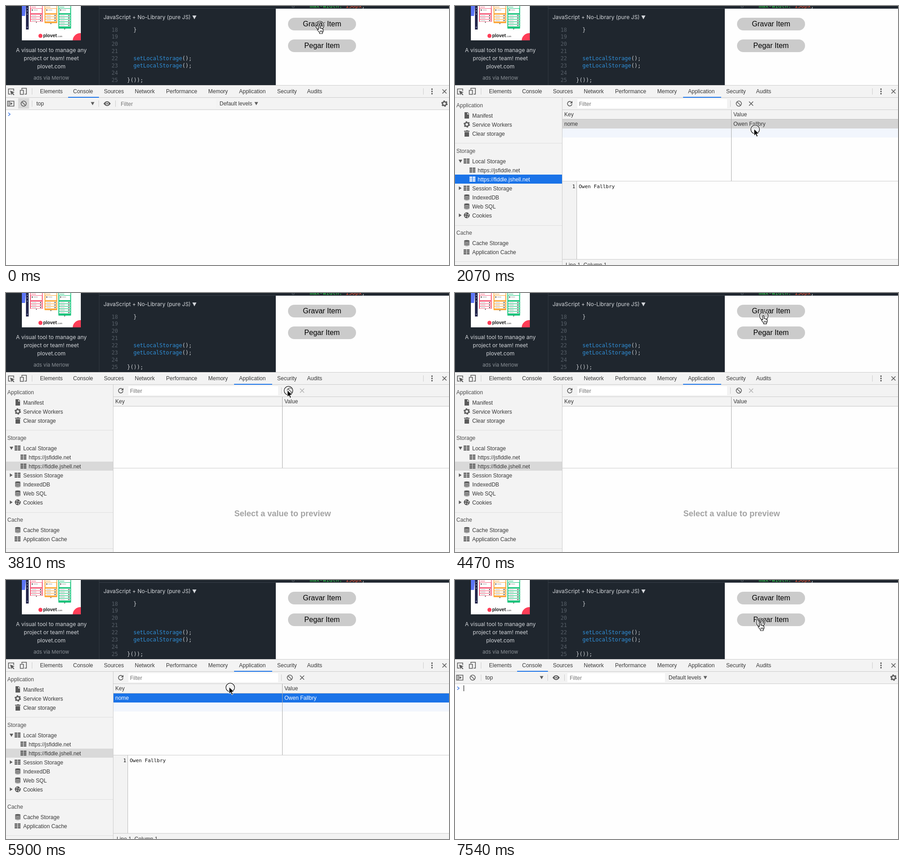
These frames come from a looping animation (977 px wide and 573 px high, 8000 ms). An HTML page:

```html
<!DOCTYPE html>
<html lang="pt">
<head>
<meta charset="utf-8">
<title>Local storage demo</title>
<style>
html, body { margin: 0; width: 100%; height: 100%; overflow: hidden; background: #fefefe; }
svg { display: block; width: 977px; height: 573px; }
text { font: 12px "Liberation Sans", Arial, sans-serif; fill: #383838; white-space: pre; }
.code { font: 11.9px "DejaVu Sans Mono", monospace; fill: #c9ccd0; }
.call { fill: #2f90da; }
.num { fill: #565e67; text-anchor: end; }
.ui { font: 12px Inter, sans-serif; fill: #d3d6da; }
.mid { text-anchor: middle; }
.small { font-size: 11px; fill: #8b9197; }
.btn { font-size: 16px; fill: #000; }
.soft { fill: #757575; }
.head { fill: #4c4c4c; }
.mono { font: 11px "DejaVu Sans Mono", monospace; fill: #111; }
.empty { font-size: 18px; font-weight: bold; fill: #a3a3a3; }
.icon { color: #5c5c5c; fill: currentColor; stroke: none; }
.line { fill: none; stroke: #5c5c5c; stroke-width: 1.6; }
.bar { fill: #f3f3f3; }
.focus rect.sel { fill: #1a73e8; }
.focus text { fill: #fff; }
.focus .icon { color: #fff; }
</style>
</head>
<body>
<svg id="stage" viewBox="0 0 977 573">
<defs>
  <path id="table" d="M-7-5.500h6v3h-6zM0-5.500h6v3h-6zM-7-1.500h6v3h-6zM0-1.500h6v3h-6zM-7 2.500h6v3h-6zM0 2.500h6v3h-6z"/>
  <g id="db"><ellipse cy="-4" rx="6" ry="2.300"/><path d="M-6-2.500q6 4 12 0v2.200q-6 4-12 0zM-6 .8q6 4 12 0V3q-6 4-12 0zM-6 4q6 4 12 0v1.200q-6 3.500-12 0z"/></g>
  <path id="doc" d="M-5-7H2L5-4V7H-5zM1-6v4h4z" fill-rule="evenodd"/>
  <path id="trash" d="M-6-6h4l1-1h3l1 1h3v2H-6zM-5-3H5V7H-5z"/>
  <g id="gear"><circle r="4.200" fill="none" stroke="currentColor" stroke-width="2.800"/><circle r="6.100" fill="none" stroke="currentColor" stroke-width="2" stroke-dasharray="3.190 3.198"/></g>
  <g id="cookie"><circle r="6.500"/><g fill="#f3f3f3"><circle cx="-2" cy="-3" r="1.300"/><circle cx="3" cy="-1" r="1.300"/><circle cx="-2.500" cy="2" r="1.300"/><circle cx="2" cy="3.500" r="1.200"/><circle cx="6" cy="-5" r="2.500"/></g></g>
  <g id="clear" class="line"><circle r="5.700"/><path d="M-4-4L4 4"/></g>
  <path id="cross" d="M-4.500-4.500l9 9m0-9l-9 9"/>
  <path id="down" d="M-4-3.500h8L0 3.500z"/>
  <path id="right" d="M-2.500-4v8l6-4z"/>
  <clipPath id="adClip"><path d="M35 0h130v76H35z"/></clipPath>
</defs>
</svg>
<script>
const PERSON = "Owen Fallbry", BRAND = "plovet", LOOP = 8000;
const stage = document.getElementById("stage");

const text = (x, y, s, cls = "") => `<text x="${x}" y="${y}" class="${cls}">${s}</text>`;
const rect = (x, y, w, h, fill, extra = "") => `<rect x="${x}" y="${y}" width="${w}" height="${h}" fill="${fill}" ${extra}/>`;
const icon = (id, x, y, cls = "icon") => `<use href="#${id}" x="${x}" y="${y}" class="${cls}"/>`;
const rule = (x, y, w, h, fill = "#cccccc") => rect(x, y, w, h, fill);
const bar = (x, y, w, h) => rect(x, y, w, h, "#f3f3f3");
const group = (id, ...parts) => `<g id="${id}">${parts.join("")}</g>`;

function adColumn(x, height, color, cards) {
  let s = rect(x, -3, 28, height + 3, color, 'rx="1"') + rect(x + 1.5, 0, 25, 5, "#fff");
  s += rect(x + 3, 2, 10, 1, color) + rect(x + 2, 6, 24, 10, "#fff") +
       `<circle cx="${x + 5}" cy="9" r="1.300" fill="#333"/>` + rect(x + 8, 8.5, 9, 1, "#999");
  for (let i = 0; i < cards; i++) {
    const y = 19 + i * 5.5;
    s += rect(x + 2, y, 24, 4.3, "#fff") + rect(x + 4, y + 1.8, 10, .8, "#999") + rect(x + 22, y + 1, 2.5, 2.2, "#444");
  }
  return s + `<circle cx="${x + 14}" cy="${height + 1}" r="1" fill="#333"/>`;
}

function page() {
  const lines = { 18: ["}", 281], 25: ["}());", 267] };
  let s = rect(0, 0, 977, 176, "#1f262e") + rule(205, 0, 1, 175, "#333a42") + rule(206, 5, 771, 1, "#39414a");
  s += '<g clip-path="url(#adClip)">' + rect(35, 0, 130, 76, "#fff") +
    '<path d="M35 0h9l-2 22h-7z" fill="#5b74f5"/>' + rect(44, 0, 6, 52, "#25284d") +
    [4, 10, 17, 46].map(y => rect(46, y, 2, 2, "#8f93b8")).join("") +
    adColumn(53, 35, "#f65f7c", 3) + adColumn(85, 38, "#fba83c", 3) + adColumn(115.5, 50, "#17c37b", 5) +
    '<circle cx="164" cy="77" r="17" fill="#ff3d57"/></g>' +
    '<circle cx="76" cy="66" r="4.500" fill="#ff3d57"/>' +
    `<text x="82" y="69" style="font:bold 10px Inter,sans-serif;fill:#222">${BRAND}<tspan style="font:5px Inter,sans-serif">.com</tspan></text>`;
  s += text(100, 102, "A visual tool to manage any", "ui mid") + text(100, 120, "project or team! meet", "ui mid") +
    text(100, 138, BRAND + ".com", "ui mid") + text(100, 163, "ads via Merlow", "ui mid small");
  s += text(215, 29, "JavaScript + No-Library (pure JS)", "ui") +
    '<path d="M411 21h9l-4.500 8.500z" fill="#d3d6da"/>';
  for (let n = 18; n <= 25; n++) {
    const y = 56.5 + (n - 18) * 15.95;
    s += text(247, y, n, "code num");
    if (lines[n]) s += text(lines[n][1], y, lines[n][0], "code");
    if (n === 22 || n === 23)
      s += text(281, y, `<tspan class="call">${n === 22 ? "set" : "get"}LocalStorage</tspan>();`, "code");
  }
  s += text(637, 3.5, "8", "code num") +
    text(670, 3.5, '<tspan fill="#2ccb4b">max-width:</tspan> <tspan fill="#f0563c">150px</tspan>;', "code");
  s += rect(595, 6, 382, 169, "#fefefe");
  ["Gravar Item", "Pegar Item"].forEach((label, i) => {
    s += rect(622, 26 + 48 * i, 150, 28, "#cbcbcb", 'rx="14"') + text(697, 45 + 48 * i, label, "btn mid");
  });
  return s;
}

function tabs() {
  const names = { Elements: 75, Console: 148, Sources: 216, Network: 284, Performance: 353, Memory: 446,
                  Application: 514, Security: 598, Audits: 664 };
  let s = bar(0, 175, 977, 27) + rule(0, 175, 977, 1) + rule(0, 202, 977, 1) + rule(57, 182, 1, 14) + rule(920, 182, 1, 14);
  for (const name in names) s += text(names[name], 192.5, name);
  s += '<path class="line" d="M17 188v-4.500H5.500V195H10"/><path class="icon" d="M9 187l10 4-4 1.500 3.500 3.500-1.500 1.500-3.500-3.500-1.500 3.500z"/>' +
    '<path class="line" d="M35 185v-3h10v13h-4M31.500 186.500h7v9h-7z"/>' +
    [184, 189, 194].map(y => `<circle cx="939.500" cy="${y}" r="1.700" class="icon"/>`).join("") + icon("cross", 967, 189, "line");
  return s + '<rect id="slider" y="201" height="2" fill="#1a73e8"/>';
}

function consolePanel() {
  return group("console", rect(0, 230, 977, 343, "#fefefe"), bar(0, 203, 977, 26), rule(0, 229, 977, 1),
    '<path class="line" stroke-width="1.200" d="M3.500 210.500h14v11h-14zM7 210v12"/><path class="icon" d="M9.500 212.500v7l5-3.500z"/>',
    '<rect id="clearHover" x="27" y="204" width="24" height="23" fill="#d9d9d9"/>', icon("clear", 39, 216, ""),
    rule(57, 209, 1, 14), text(67, 220, "top"), icon("down", 191, 216), rule(204, 209, 1, 14),
    '<path class="icon" d="M215 216q8-10.500 16 0q-8 10.500-16 0z"/><circle cx="223" cy="216" r="3.200" fill="#f3f3f3"/><circle cx="223" cy="216" r="1.800" class="icon"/>',
    rule(241, 209, 1, 14), '<rect id="filter" x="248" y="206" width="215" height="20" fill="#fff"/>',
    text(253, 220.5, "Filter", "soft"), text(471, 220, "Default levels"), icon("down", 552, 216), icon("gear", 967, 216),
    '<path d="M5 236l4 3.500-4 3.500" fill="none" stroke="#3b78e7" stroke-width="1.600"/>',
    '<rect id="caret" x="19" y="233" width="1" height="13" fill="#000"/>');
}

function storagePanel() {
  const items = [["Manifest", "doc", 242], ["Service Workers", "gear", 262], ["Clear storage", "trash", 282],
    ["Local Storage", "table", 343], ["Session Storage", "table", 403], ["IndexedDB", "db", 423], ["Web SQL", "db", 443],
    ["Cookies", "cookie", 463], ["Cache Storage", "db", 524], ["Application Cache", "table", 544]];
  const side = bar(0, 203, 236, 370) + [303, 485, 565].map(y => rule(0, y, 236, 1, "#dedede")).join("") +
    [["Application", 224], ["Storage", 325], ["Cache", 505.5]].map(([s, y]) => text(3, y, s, "head")).join("") +
    items.map(([s, id, y]) => icon(id, 26, y) + text(38, y + 4.5, s)).join("") +
    icon("down", 12, 343.5, "icon soft") + icon("right", 11, 403) + icon("right", 11, 463) +
    icon("table", 39, 363) + text(50, 367.5, "https://jsfiddle.net") +
    group("origin", rect(0, 373, 236, 20, "#d9d9d9", 'class="sel"'), icon("table", 39, 383), text(50, 387.5, "https://fiddle.jshell.net")) +
    rule(236, 203, 1, 370);
  const main = rect(237, 230, 740, 343, "#fefefe") + bar(237, 203, 740, 47) + rule(237, 229, 740, 1) +
    '<path class="line" d="M257 213a5 5 0 1 0 1 4"/><path class="icon" d="M259 210v5.500h-5.500z"/>' +
    rect(270, 206, 330, 20, "#fff") + text(273.5, 220.5, "Filter", "soft") + rule(607, 209, 1, 14) +
    icon("clear", 626, 216, "") + '<use id="remove" href="#cross" x="653" y="216" fill="none" stroke-width="1.600"/>' +
    text(241, 244, "Key") + text(614, 244, "Value") +
    group("row", rect(237, 271, 740, 20, "#f2f6fd"), '<rect id="rowBack" class="sel" x="237" y="250" width="740" height="21"/>',
      text(241, 264.5, "nome"), text(614, 264.5, PERSON)) +
    rule(237, 250, 740, 1, "#c4c4c4") + rule(609, 230, 1, 157, "#aaaaaa") + rule(237, 387, 740, 1);
  const preview = group("preview", bar(237, 388, 31, 172), rule(268, 388, 1, 172, "#bbbbbb"),
    text(265, 402.5, "1", "mono num"), text(273, 402.5, PERSON, "mono"),
    bar(237, 560, 740, 13), rule(237, 560, 740, 1), text(244, 577, "Line 1, Column 1"));
  return group("storage", side, main, preview, group("empty", text(610, 494, "Select a value to preview", "empty mid")));
}

const pointer = group("pointer",
  '<circle r="9.600" fill="none" stroke="#fff" stroke-width="3.200"/><circle r="9.600" fill="none" stroke="#111" stroke-width="1.300"/>',
  '<path id="arrow" d="M-2.500-1v15l3.500-3.300 2.400 5.600 2.600-1.100-2.400-5.500h4.900z" fill="#000" stroke="#fff"/>',
  '<path id="hand" d="M-2.500 9V1.500q0-2 1.500-2t1.500 2V6q2.500-1 2.700 1q2.300-.8 2.500 1q2-.3 2 1.700v3.300l-1.700 3V18h-6.500v-2l-4.800-6q-.5-2 1.200-1.800z" fill="#fff" stroke="#111" stroke-width="1.200"/><path id="knuckles" d="M.8 11v4M3 11v4M5.200 11v4" stroke="#111"/>');

stage.insertAdjacentHTML("beforeend", page() + consolePanel() + storagePanel() + tabs() + pointer);

const el = id => document.getElementById(id);
const show = (id, on) => el(id).style.display = on ? "" : "none";
const within = (t, a, b) => t >= a && t < b;
const easeOut = p => 1 - (1 - Math.min(p, 1)) ** 2;

// Pointer stops: time, x, y
const path = [[0, 692, 43], [140, 692, 43], [230, 688, 48], [760, 688, 48], [1070, 576, 189], [1400, 576, 189],
  [2070, 662, 273], [2130, 661, 267], [2260, 661, 267], [2960, 667, 261], [3250, 667, 261], [3650, 623, 216],
  [3850, 623, 216], [4050, 623, 222], [4080, 623, 222], [4530, 684, 42], [4930, 684, 42], [5260, 652, 288],
  [5450, 658, 263], [5740, 658, 263], [6160, 160, 186], [6270, 168, 191], [6560, 168, 191], [7190, 675, 96],
  [7420, 675, 96], [7540, 674, 94], [LOOP, 674, 94]];

function pointerAt(t) {
  const i = path.findIndex(k => k[0] > t), [t0, x0, y0] = path[i - 1], [t1, x1, y1] = path[i];
  const p = (t - t0) / (t1 - t0), e = p * p * (3 - 2 * p);
  return [x0 + (x1 - x0) * e, y0 + (y1 - y0) * e];
}

function sliderAt(t) {
  if (within(t, 1280, 6480)) return [428 + 75 * easeOut((t - 1280) / 70), 84];
  return [t < 1280 ? 137 : 306 - 169 * easeOut((t - 6480) / 90), 68];
}

function draw(now) {
  const t = now % LOOP;
  const inStorage = within(t, 1280, 6480);
  const chosen = t < 3700 || t >= 5450;
  const active = chosen && t >= 2350;

  show("console", !inStorage);
  show("storage", inStorage);
  show("clearHover", t < 1280);
  el("filter").setAttribute("fill", t < 1280 ? "#f5f5f5" : "#fff");
  show("caret", within(t, 6540, 7040) || t >= 7540);

  show("row", !within(t, 3700, 4790));
  el("row").classList.toggle("focus", active);
  el("rowBack").setAttribute("fill", chosen ? "#d4d4d4" : "#fefefe");
  el("origin").classList.toggle("focus", within(t, 1310, 2350));
  el("remove").setAttribute("stroke", chosen ? "#5c5c5c" : "#b5b5b5");
  show("preview", chosen);
  show("empty", !chosen);

  const [sx, sw] = sliderAt(t);
  el("slider").setAttribute("x", sx);
  el("slider").setAttribute("width", sw);

  const [x, y] = pointerAt(t);
  const onButton = within(x, 622, 772) && (within(y, 26, 54) || within(y, 74, 102));
  const onTab = within(y, 176, 202) && within(x, 64, 710);
  el("pointer").setAttribute("transform", `translate(${x} ${y})`);
  show("arrow", !onButton && !onTab);
  show("hand", onButton || onTab);
  show("knuckles", onButton || onTab);
  requestAnimationFrame(draw);
}
requestAnimationFrame(draw);
</script>
</body>
</html>
```
